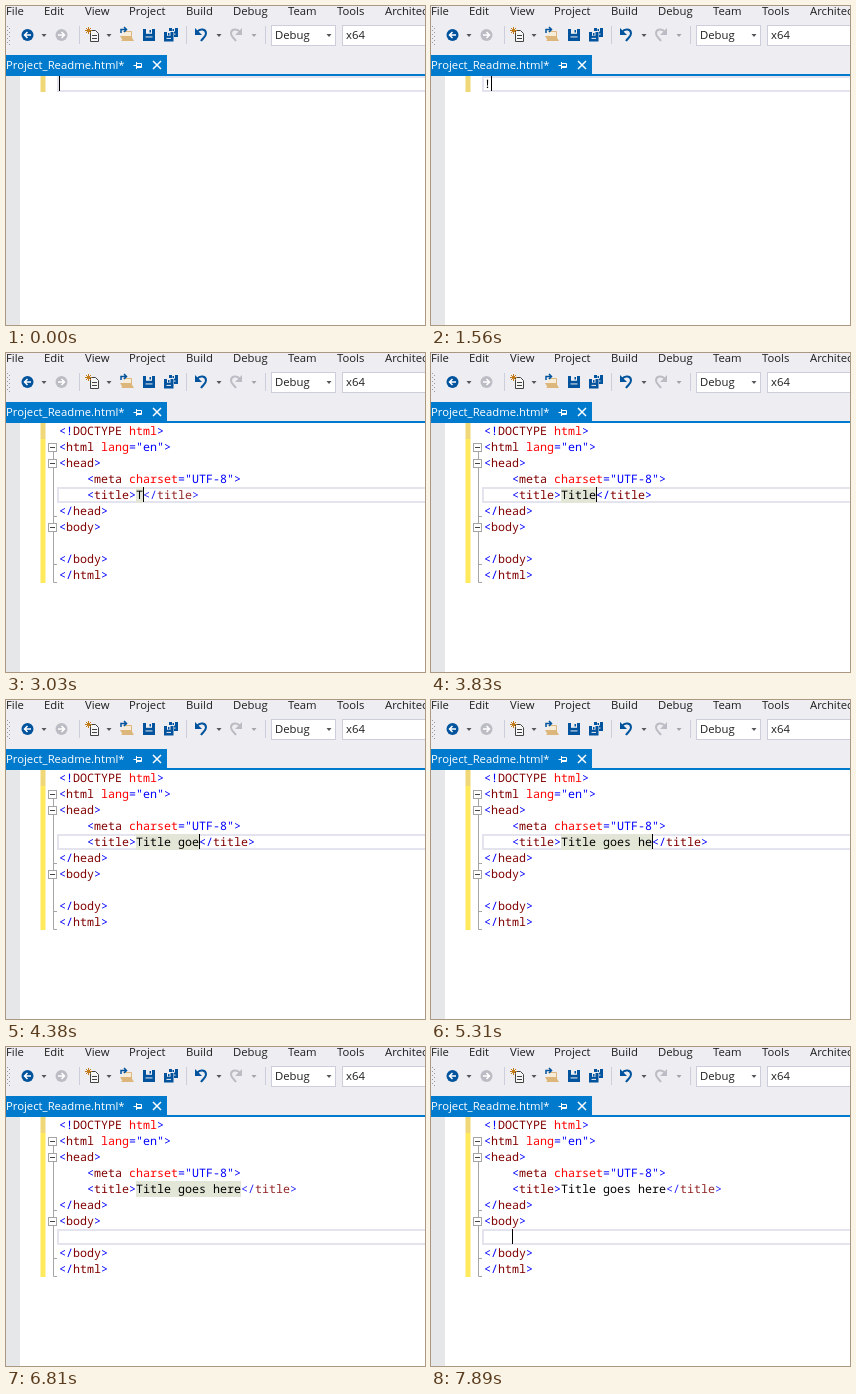
An HTML page for the animation above (8000 ms loop, 419 by 319 pixels).

```html
<!DOCTYPE html>
<html lang="en">
<head>
<meta charset="utf-8">
<title>Editor snippet</title>
<style>
html, body { margin: 0; width: 100%; height: 100%; overflow: hidden; background: #fff; }
svg { display: block; }
text { white-space: pre; }
.ui { font: 11.3px "Open Sans", "Noto Sans", sans-serif; fill: #1e1e1e; }
.code { font: 11.667px "Noto Sans Mono", "DejaVu Sans Mono", monospace; text-rendering: geometricPrecision; }
</style>
</head>
<body>
<svg id="stage" width="419" height="319" viewBox="0 0 419 319"></svg>
<script>
const LOOP = 8000, LEFT = 53, TOP = 70, CHAR = 7, LINE = 16;
const BLUE = '#0000ff', MAROON = '#800000', RED = '#ff0000', BLACK = '#000';
const TITLE = 'Title goes here', TITLE_COL = 11;

const colX = col => LEFT + CHAR * col;
const rowY = row => TOP + LINE * row;
const rect = (x, y, w, h, fill, extra = '') =>
  `<rect x="${x}" y="${y}" width="${w}" height="${h}" fill="${fill}" ${extra}/>`;
const path = (d, stroke, width = 1, fill = 'none') =>
  `<path d="${d}" stroke="${stroke}" stroke-width="${width}" fill="${fill}"/>`;
const label = (x, y, s, extra = '') => `<text class="ui" x="${x}" y="${y}" ${extra}>${s}</text>`;
const escape = s => s.replace(/</g, '&lt;').replace(/>/g, '&gt;');

// Lays out [text, colour] pairs on the character grid.
function codeLine(row, col, tokens) {
  return tokens.map(([s, color]) => {
    const out = `<text class="code" x="${colX(col)}" y="${rowY(row) + 12}" fill="${color}">${escape(s)}</text>`;
    col += s.length;
    return out;
  }).join('');
}
const openTag = name => [['<', BLUE], [name, MAROON], ['>', BLUE]];
const closeTag = name => [['</', BLUE], [name, MAROON], ['>', BLUE]];
const attrTag = (name, attr, value) =>
  [['<', BLUE], [name + ' ', MAROON], [attr, RED], [`="${value}">`, BLUE]];

function toolbar() {
  const blue = '#00539c', gray = '#bcbdc4', gold = '#dcb67a', panel = '#eeeef2';
  const arrow = (x, fill = '#55555a') => path(`M${x - 2.5} 28h5l-2.500 3z`, 'none', 0, fill);
  const divider = x => rect(x, 20, 1, 18, '#cccedb');
  const disc = (x, fill, d) => `<circle cx="${x}" cy="29" r="6" fill="${fill}"/>` + path(d, '#fff', 1.5);
  const floppy = (x, y, s) => rect(x, y, s, s, blue) +
    rect(x + 3, y, s - 6, s * .4, panel) + rect(x + s - 5.5, y + 1, 1.5, 2.5, blue) +
    rect(x + 2.5, y + s * .62, s - 5, 1, panel);
  let grip = '';
  for (let y = 20; y < 40; y += 4) grip += rect(1, y, 1, 1, '#999') + rect(3, y + 2, 1, 1, '#999');
  const curl = path('M191 26C194 22 200 23 200 27.500C200 30.500 197 32 195 35', 'currentColor', 2) +
    path('M189 22v7h7z', 'none', 0, 'currentColor');
  return grip +
    disc(21.5, blue, 'M25 29h-6.500M21.500 26l-3 3l3 3') + arrow(38) +
    disc(55.5, gray, 'M52 29h6.500M55.500 26l3 3l-3 3') + divider(73) +
    path('M84.500 24.500h5l3 3v8h-8z', '#424242', 1, '#f6f6f6') + path('M86 29.500h5M86 32.500h5', '#424242') +
    path('M82.500 21v7M79 24.500h7M80 22l5 5M85 22l-5 5', '#c27d1a') + arrow(103) +
    path('M117.500 25.500h8v9h-10', gold, 1, '#f7ecd8') + path('M114 30h11l3 5h-11z', 'none', 0, gold) +
    path('M115 27v-3.500h5M118 21l2.500 2.500l-2.500 2.500', blue, 1.5) +
    floppy(137, 23, 12) + floppy(163, 22, 9) + rect(157, 25, 11, 11, panel) + floppy(158, 26, 9.5) +
    divider(180) + `<g color="${blue}">${curl}</g>` + arrow(213) +
    `<g color="${gray}" transform="translate(425 0) scale(-1 1)">${curl}</g>` + arrow(248, '#a2a4a5') +
    divider(259) +
    rect(265.5, 19.5, 64, 20, '#fff', 'stroke="#cccedb"') + label(269, 33, 'Debug') + arrow(323) +
    rect(336.5, 19.5, 100, 20, '#fff', 'stroke="#cccedb"') + label(340, 33, 'x64');
}

function chrome() {
  const menu = [[0, 'File'], [38, 'Edit'], [79, 'View'], [123, 'Project'], [180, 'Build'],
    [227, 'Debug'], [282, 'Team'], [331, 'Tools'], [379, 'Architecture']];
  return rect(0, 0, 419, 70, '#eeeef2') + menu.map(([x, s]) => label(x, 9, s)).join('') + toolbar() +
    rect(0, 49, 161, 21, '#007acc') + rect(0, 68, 419, 2, '#007acc') +
    label(0, 63, 'Project_Readme.html*', 'style="fill:#fff"') +
    path('M127.500 59.500h3M130.500 56v7M131 57.500h4.500v4h-4.500M131 60.500h4.500', '#fff') +
    path('M147 55l8 8M155 55l-8 8', '#fff', 1.5) +
    rect(0, 70, 14, 249, '#e6e7e8') + rect(34.5, 70, 5, 16, '#f0d878');
}

function outlining() {
  const gray = '#a5a5a5';
  const box = row => {
    const y = rowY(row) + 4;
    return rect(42.5, y + .5, 8, 8, '#fff', `stroke="${gray}"`) + rect(44, y + 4, 5, 1, '#444');
  };
  return path('M47.500 98V229.500H51M47.500 163.500H51M47.500 211.500H51', gray) + [1, 2, 6].map(box).join('');
}

const markup =
  rect(34.5, 86, 5, 144, '#ffe95c') +
  codeLine(0, 0, [['<!', BLUE], ['DOCTYPE ', MAROON], ['html', RED], ['>', BLUE]]) +
  codeLine(1, 0, attrTag('html', 'lang', 'en')) +
  codeLine(2, 0, openTag('head')) +
  codeLine(3, 4, attrTag('meta', 'charset', 'UTF-8')) +
  codeLine(4, 4, openTag('title')) +
  codeLine(5, 0, closeTag('head')) +
  codeLine(6, 0, openTag('body')) +
  codeLine(8, 0, closeTag('body')) +
  codeLine(9, 0, closeTag('html'));

const stage = document.getElementById('stage');
stage.innerHTML = rect(0, 0, 419, 319, '#fff') + chrome() +
  rect(52, 0, 380, LINE - 2, 'none', 'id="current" stroke="#e4e4ee" stroke-width="2"') +
  rect(colX(TITLE_COL), rowY(4), 0, LINE, '#e2e6d6', 'id="field"') +
  `<g id="bang">${codeLine(0, 0, [['!', BLACK]])}</g>` +
  `<g id="markup">${markup}</g><g id="outline">${outlining()}</g>` +
  `<g id="title">${codeLine(4, TITLE_COL, [['Document', BLACK]])}</g>` +
  `<g id="closing">${codeLine(4, TITLE_COL, closeTag('title'))}</g>` +
  rect(0, 0, 1, 15, BLACK, 'id="caret"');

const part = {};
for (const el of stage.querySelectorAll('[id]')) part[el.id] = el;
const titleText = part.title.firstChild;
const show = (el, on) => el.setAttribute('visibility', on ? 'visible' : 'hidden');
const within = (t, from, to) => t >= from && t < to;

// [time, characters of the title typed]
const KEYS = [[3030, 1], [3510, 2], [3680, 3], [3755, 4], [3830, 5], [3980, 6], [4230, 7], [4305, 8],
  [4380, 9], [4550, 10], [4655, 11], [5235, 12], [5310, 13], [5460, 15]];
const CARET_OFF = [[530, 1030], [2580, 3030], [5160, 5235], [5950, 6330], [6810, 7190], [7360, 7890]];

function caretCell(t, typed) {
  if (t < 1560) return [0, 0];
  if (t < 2040) return [0, 1];
  if (t < 5770) return [4, TITLE_COL + typed];
  if (t < 5860) return [5, 7];
  if (t < 5950) return [6, 6];
  return [7, t < 7190 ? 0 : 4];
}

function draw(t) {
  const expanded = t >= 2040, selecting = within(t, 2040, 3030);
  const typed = KEYS.reduce((n, [at, count]) => t >= at ? count : n, 0);
  const content = selecting ? 'Document' : TITLE.slice(0, typed);
  const width = content.length * CHAR;
  const [row, col] = caretCell(t, typed);

  show(part.bang, within(t, 1560, 2040));
  for (const id of ['markup', 'title', 'closing']) show(part[id], expanded);
  show(part.outline, t >= 2120);
  titleText.textContent = content;
  part.closing.setAttribute('transform', `translate(${width} 0)`);
  part.closing.setAttribute('opacity', within(t, 3030, 3130) || t >= 5460 ? .85 : 1);

  show(part.field, within(t, 2040, 6960));
  part.field.setAttribute('width', width);
  part.field.setAttribute('fill', selecting ? '#9cc7e6' : '#e2e6d6');

  show(part.current, !selecting);
  part.current.setAttribute('y', rowY(row) + 1);
  show(part.caret, !CARET_OFF.some(([from, to]) => within(t, from, to)));
  part.caret.setAttribute('x', colX(col));
  part.caret.setAttribute('y', rowY(row));
}

function tick() {
  draw(performance.now() % LOOP);
  requestAnimationFrame(tick);
}
tick();
</script>
</body>
</html>
```
